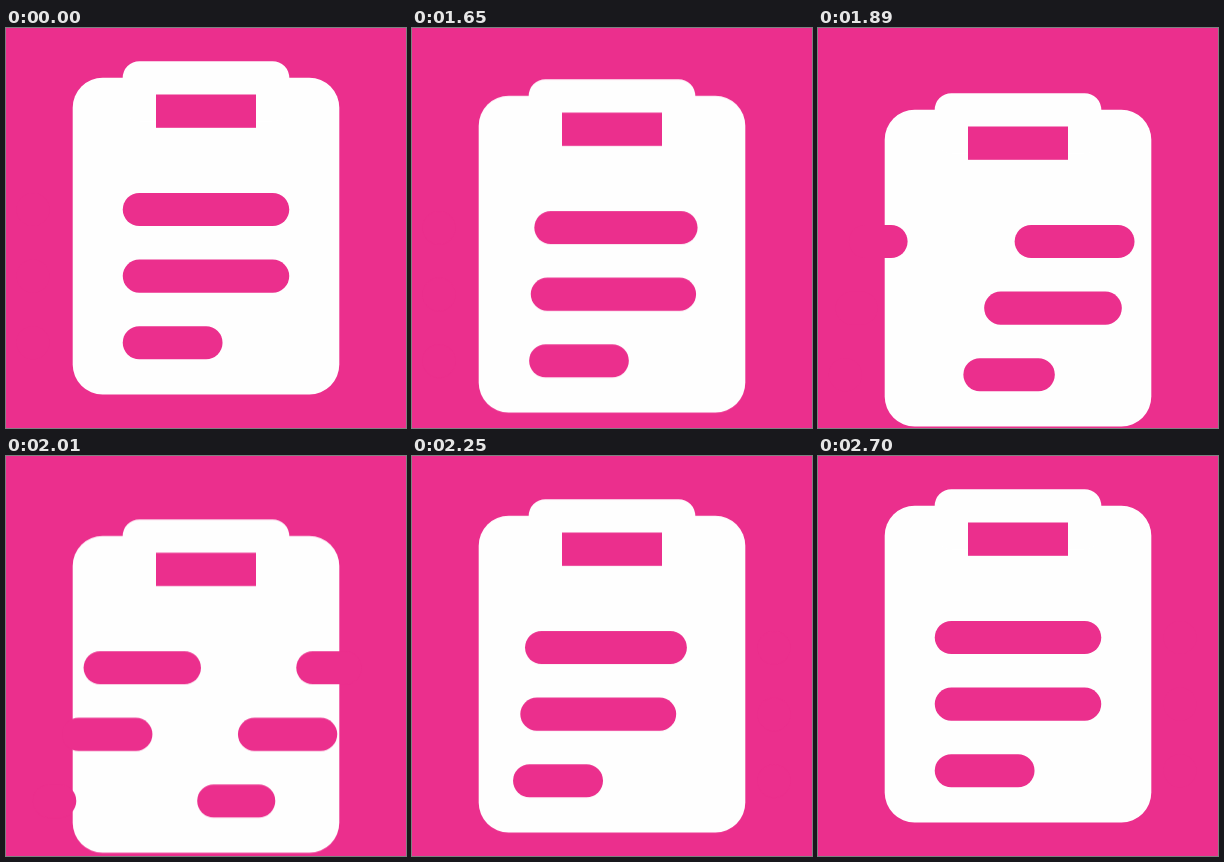
Animation of 400x400 px, one loop 2.73 s. Source, as an HTML page:

```html
<!DOCTYPE html>
<html lang="en">
<head>
<meta charset="utf-8">
<title>Clipboard</title>
<style>
  html, body { margin: 0; width: 100%; height: 100%; overflow: hidden; background: #eb2f8d; }
  svg { display: block; width: 100%; height: 100%; }
  .paper { fill: #fefefe; }
  .hole { fill: #eb2f8d; }
  .bars { fill: none; stroke: #eb2f8d; stroke-width: 33.1; stroke-linecap: round; }

  /* the board dips and returns */
  .board { animation: dip 2730ms cubic-bezier(.4, 0, .2, 1) infinite; }
  @keyframes dip {
    0%, 54.95% { transform: translateY(0); }
    69.6% { transform: translateY(32px); }
    98.9%, 100% { transform: translateY(0); }
  }

  /* each bar shrinks out to the right while its twin grows in from the left */
  .out { animation: 2730ms cubic-bezier(.32, 0, .67, 0) infinite; }
  .in { animation: 2730ms cubic-bezier(.4, 0, .2, 1) infinite; }
  .out.a { animation-name: out-a; }
  .out.b { animation-name: out-b; }
  .out.c { animation-name: out-c; }
  .in.a { animation-name: in-a; }
  .in.b { animation-name: in-b; }
  .in.c { animation-name: in-c; }

  @keyframes out-a {
    0%, 54.5% { d: path("M133.3 0L266.7 0"); }
    75.5%, 100% { d: path("M362 0L362 0"); }
  }
  @keyframes out-b {
    0%, 56% { d: path("M133.3 0L266.7 0"); }
    78.2%, 100% { d: path("M362 0L362 0"); }
  }
  @keyframes out-c {
    0%, 57.8% { d: path("M133.3 0L200 0"); }
    80.9%, 100% { d: path("M362 0L362 0"); }
  }
  @keyframes in-a {
    0%, 63.6% { d: path("M27 0L27 0"); }
    88.2%, 100% { d: path("M133.3 0L266.7 0"); }
  }
  @keyframes in-b {
    0%, 65.4% { d: path("M27 0L27 0"); }
    91%, 100% { d: path("M133.3 0L266.7 0"); }
  }
  @keyframes in-c {
    0%, 68.5% { d: path("M27 0L27 0"); }
    92.9%, 100% { d: path("M133.3 0L200 0"); }
  }
</style>
</head>
<body>
<svg viewBox="0 0 400 400">
  <g class="board">
    <rect class="paper" x="66.7" y="49.8" width="266.6" height="316.7" rx="30"/>
    <rect class="paper" x="116.7" y="33.2" width="166.6" height="60" rx="16.7"/>
    <rect class="hole" x="150" y="66.5" width="100" height="33.3"/>
    <g class="bars">
      <g transform="translate(0 181.5)">
        <path class="out a" d="M133.3 0L266.7 0"/>
        <path class="in a" d="M27 0L27 0"/>
      </g>
      <g transform="translate(0 248.1)">
        <path class="out b" d="M133.3 0L266.7 0"/>
        <path class="in b" d="M27 0L27 0"/>
      </g>
      <g transform="translate(0 314.7)">
        <path class="out c" d="M133.3 0L200 0"/>
        <path class="in c" d="M27 0L27 0"/>
      </g>
    </g>
  </g>
</svg>
</body>
</html>
```
